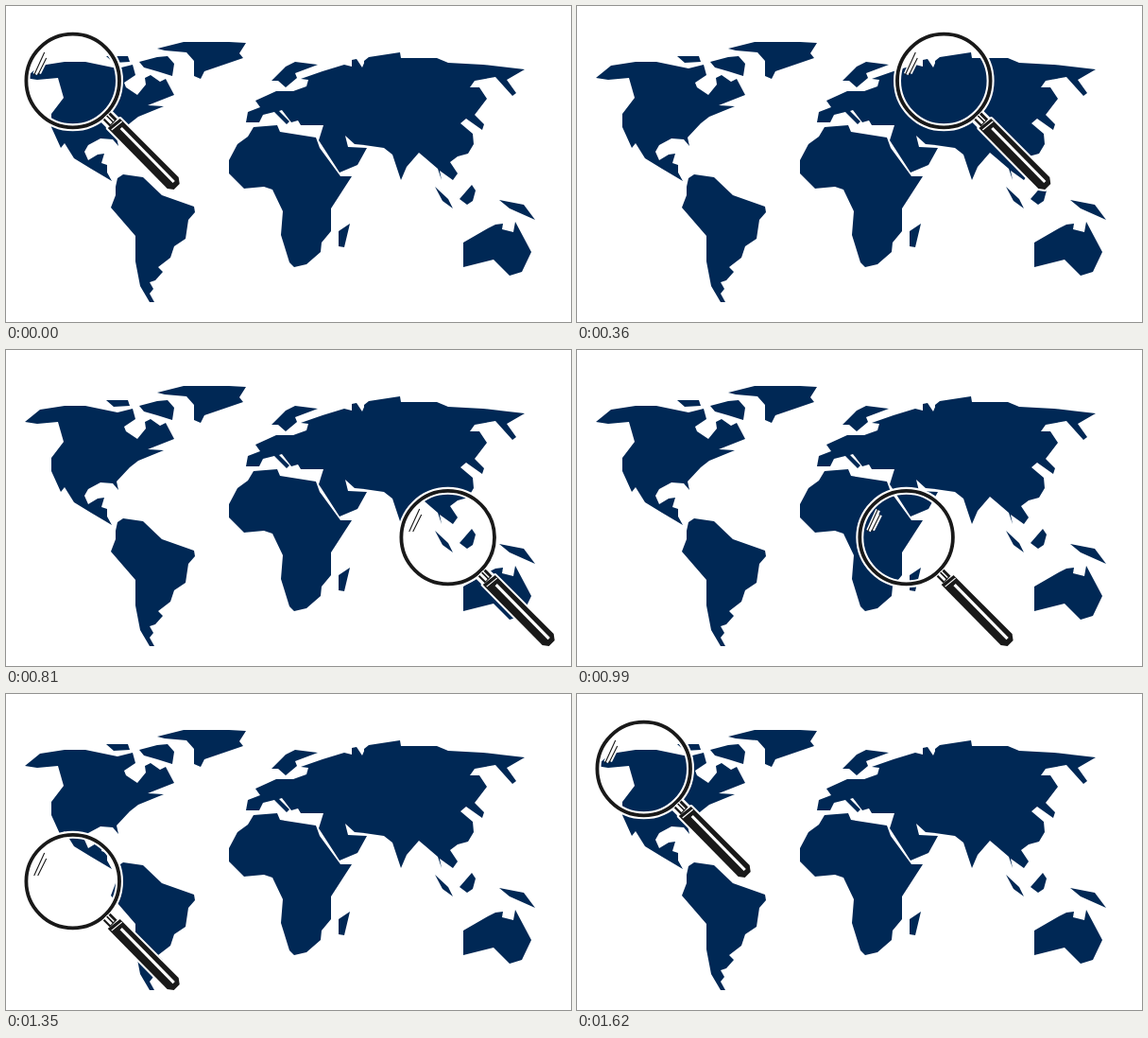
These frames come from a looping animation (598 by 334 pixels, 1.72 s). An HTML page:

```html
<!DOCTYPE html>
<html>
<head>
<meta charset="utf-8">
<style>
html, body { margin: 0; width: 100%; height: 100%; overflow: hidden; background: #fff; }
svg { display: block; }
#land { fill: #002855; }
.halo { fill: none; stroke: #fff; stroke-linejoin: round; }
.ink { fill: none; stroke: #191919; }
</style>
</head>
<body>
<svg width="598" height="334" viewBox="0 0 598 334">
  <g id="land">
    <!-- North America -->
    <path d="M20 76 36 63 62 59 84 59 118 66 134 62 137 73 125 81 127 86 139 94 148 83 147 76 153 73 163 80 169 77 178 94 150 105 167 106 140 117 131 124 117 139 119 148 113 141 100 140 87 147 83 154 87 163 97 157 104 156 101 166 107 168 107 176 112 185 90 172 72 161 62 145 58 150 48 128 48 114 61 97 55 76 33 78Z"/>
    <path d="M106 53 129 53 131 59 114 60ZM141 59 160 54 171 53 178 61 176 74 160 69 146 65Z"/>
    <!-- Greenland -->
    <path d="M160 45 188 38 236 38 254 39 247 50 251 55 210 69 206 77 199 74 199 58 191 49 168 47Z"/>
    <!-- South America -->
    <path d="M118 182 124 178 145 181 165 200 199 212 200 218 193 226 190 246 178 254 174 266 161 276 166 281 158 290 152 292 156 299 152 304 157 313 152 313 142 296 137 270 137 243 111 213 116 200 116 191Z"/>
    <!-- Africa -->
    <path d="M262 128 287 126 290 133 328 139 332 150 354 180 366 180 344 214 344 238 334 250 333 260 318 273 305 276 300 271 291 242 293 217 282 194 273 191 252 193 236 177 236 163 245 146 256 138ZM352 238 364 230 358 255 352 254Z"/>
    <!-- Europe and Arabia -->
    <path d="M254 123 256 112 269 107 264 100 286 90 304 90 318 85 320 78 312 77 335 69 358 62 366 64 366 57 371 56 377 65 380 58 380 147 369 146 359 137 362 149 382 150 372 168 353 176 331 142 336 126 312 126 309 121 302 123 292 110 289 111 300 122 297 125 284 112 272 115 268 123Z"/>
    <path d="M281 79 296 64 306 59 330 62 306 71 308 76 296 86 288 79Z"/>
    <!-- Asia -->
    <path d="M379 58 384 54 417 49 418 55 456 55 468 60 505 62 549 67 530 78 540 92 536 95 518 75 496 79 491 86 501 86 509 98 496 115 506 125 504 131 487 119 481 124 494 135 495 146 489 156 478 159 470 165 478 177 473 184 459 174 461 184 457 172 443 160 437 155 424 170 418 184 409 157 400 150 379 147Z"/>
    <!-- Islands and Australia -->
    <path d="M454 191 468 204 473 214 462 206ZM480 204 493 189 497 195 494 206 488 210ZM522 205 548 210 560 226 533 214Z"/>
    <path d="M484 250 510 235 518 231 526 230 525 236 537 239 539 228 556 260 546 281 533 285 516 268 484 276Z"/>
  </g>
  <g id="lens">
    <circle class="halo" r="49.3" stroke-width="8"/>
    <path class="halo" stroke-width="17" d="M34 36 44 46"/>
    <path class="halo" stroke-width="4" d="M37 50 50 40 112 102 113 109 107 115 100 114Z"/>
    <circle class="ink" r="49.3" stroke-width="3.8"/>
    <path class="ink" stroke-width="11" d="M36 37.5 43 44.5"/>
    <path class="halo" stroke-width="6" d="M35 37 42 44"/>
    <path class="ink" stroke-width="1.6" d="M36 37 43 44"/>
    <path fill="#191919" d="M37 50 50 40 112 102 113 109 107 115 100 114Z"/>
    <path class="halo" stroke-width="1.2" d="M41 52 52 43"/>
    <path class="halo" stroke-width="3.2" d="M51 50 107 107"/>
    <path class="halo" stroke-width="5" d="M-40-7-30-29M-36-8-28-24"/>
    <path class="ink" stroke-width="1.1" d="M-41-6-30-30M-37-6-28-24"/>
  </g>
</svg>
<script>
const lens = document.getElementById("lens");
const STEP = 90, LOOP = 1720, UNIT = 39.7;

// Each move is [dx, dy] in units of half a stride.
const moves = [
  ...Array(5).fill([2, 0]),
  [0, .5], [0, .5], [0, 1], [0, 1],
  [-1, 0], ...Array(4).fill([-2, 0]), [-1, 0],
  ...Array(3).fill([0, -1])
];
const stops = [[70.7, 79]];
for (const [dx, dy] of moves) {
  const [x, y] = stops[stops.length - 1];
  stops.push([x + dx * UNIT, y + dy * UNIT]);
}

function draw() {
  const i = Math.min(Math.floor(performance.now() % LOOP / STEP), stops.length - 1);
  lens.setAttribute("transform", `translate(${stops[i]})`);
  requestAnimationFrame(draw);
}
draw();
</script>
</body>
</html>
```
